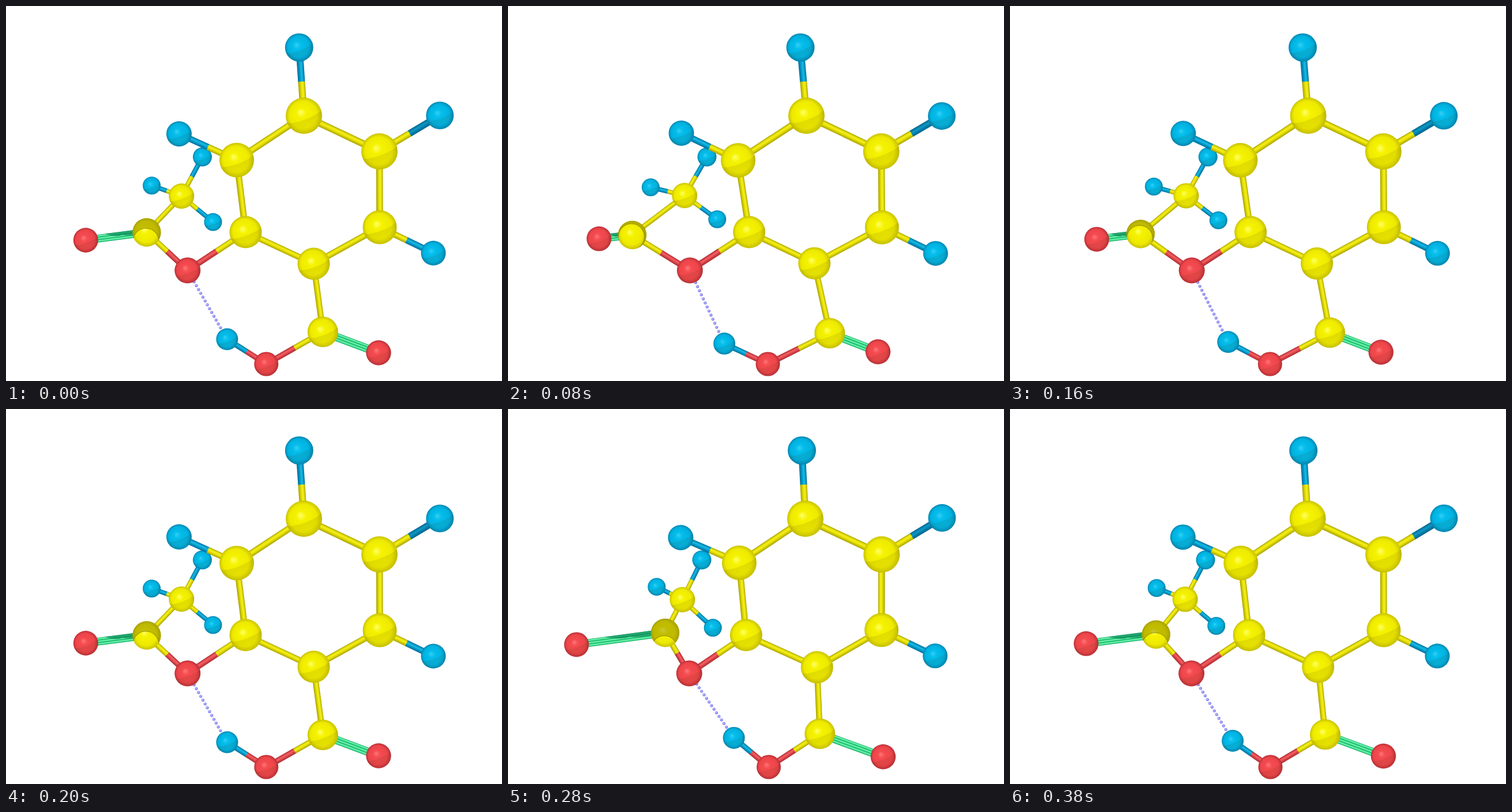
Write an HTML page with a canvas that moves like this. It is 860x651 px and loops after 400 ms.

```html
<!DOCTYPE html>
<html lang="en">
<head>
<meta charset="utf-8">
<title>Molecular vibration</title>
<style>
html, body { margin: 0; width: 100%; height: 100%; overflow: hidden; background: #fff; }
canvas { display: block; }
</style>
</head>
<body>
<canvas id="stage" width="860" height="651"></canvas>
<script>
const ctx = document.getElementById('stage').getContext('2d');
const PERIOD = 400, STEP = 20, TAU = Math.PI * 2;

// light, body, rim colours; size relative to a carbon at the same depth
const KINDS = {
  C: { tones: ['#ffff66', '#f5f200', '#eeea00', '#c9c200'], rod: ['#a8a100', '#e3dd00', '#f5ef20'], size: 1 },
  H: { tones: ['#35cff5', '#04bdeb', '#00b2e0', '#0086b2'], rod: ['#006c98', '#009fce', '#20b9e3'], size: .77 },
  O: { tones: ['#ff7778', '#f44b4f', '#ec454a', '#b93037'], rod: ['#a92f35', '#df4549', '#f26468'], size: .83 }
};
const GREEN = ['#16a266', '#3ce28d', '#8af6bb'];

// kind, x, y, radius, swing x, swing y
const ATOMS = {
  c1: ['C', 516.5, 190.5, 31.5, 1, 0],
  c2: ['C', 647.5, 252.5, 31.5, -.3, 0],
  c3: ['C', 648, 384, 29.5, .4, .2],
  c4: ['C', 533.5, 447.5, 28, -2.4, -.8],
  c5: ['C', 415.5, 392.5, 28, 2.8, 0],
  c6: ['C', 400, 267.5, 30, -1, .6],
  h1: ['H', 508.3, 72, 24.5, -1.3, 0],
  h2: ['H', 752.3, 190, 24, -.2, 1],
  h3: ['H', 741, 429, 21.5, .4, .5],
  h6: ['H', 300, 222, 22, .6, -1.3],
  acid: ['C', 549.3, 565.8, 26.5, 9, 2.2],
  oAcid: ['O', 646, 602, 21.7, -4.7, -1.8],
  oh: ['O', 451.3, 621.5, 21, -.8, 0],
  hAcid: ['H', 383.4, 578.5, 19, -8.7, 8],
  ester: ['O', 314.8, 459, 22.5, .6, 0],
  acyl: ['C', 244, 393, 24.7, -30, 4.7],
  oAcyl: ['O', 138.3, 406.5, 21.5, 20.5, -2.6],
  methyl: ['C', 304.3, 330, 22, 2, -1],
  ha: ['H', 340.5, 262, 16.5, 4.7, 0],
  hb: ['H', 252.6, 311.7, 15.5, -5.5, 3.2],
  hc: ['H', 359, 375, 15.5, 4, -5]
};
const BONDS = `c1 c2,c2 c3,c3 c4,c4 c5,c5 c6,c6 c1,c1 h1,c2 h2,c3 h3,c6 h6,
c4 acid,acid oh,oh hAcid,c5 ester,ester acyl,acyl methyl,methyl ha,methyl hb,methyl hc,
acid oAcid 2,acyl oAcyl 2`.split(',').map(b => b.trim().split(' '));

function pose(s) {
  const out = {};
  for (const [id, [kind, x, y, r, dx, dy]] of Object.entries(ATOMS))
    out[id] = { id, kind, x: x + dx * s, y: y + dy * s, r, depth: r / KINDS[kind].size };
  return out;
}

function rod(x, w, len, [rim, body, light]) {
  const g = ctx.createLinearGradient(0, -w / 2, 0, w / 2);
  [[0, rim], [.22, body], [.42, light], [.62, body], [1, rim]].forEach(([at, c]) => g.addColorStop(at, c));
  ctx.fillStyle = g;
  ctx.fillRect(x, -w / 2, len, w);
}

function bond(a, b, double) {
  const dx = b.x - a.x, dy = b.y - a.y, len = Math.hypot(dx, dy);
  const w = .19 * (a.depth + b.depth);
  ctx.save();
  ctx.translate(a.x, a.y);
  ctx.rotate(Math.atan2(dy, dx));
  if (dx < 0) ctx.scale(1, -1);
  if (double) {
    const tube = w * .53;
    for (const side of [-1, 0, 1]) {
      ctx.save();
      ctx.translate(0, side * w * .45);
      rod(0, tube, len, GREEN);
      ctx.restore();
    }
    if (a.id === 'acyl') {
      ctx.fillStyle = 'rgba(0,125,80,.62)';
      ctx.beginPath();
      ctx.moveTo(0, -w * .7);
      ctx.lineTo(len * .68, -w * .7);
      ctx.quadraticCurveTo(len * .5, w * .25, len * .4, -w * .1);
      ctx.quadraticCurveTo(len * .3, w * .3, 0, w * .1);
      ctx.fill();
    }
  } else {
    rod(0, w, len / 2 + .5, KINDS[a.kind].rod);
    rod(len / 2, w, len / 2, KINDS[b.kind].rod);
    if (b.id === 'h2') {
      ctx.fillStyle = 'rgba(0,70,110,.3)';
      ctx.fillRect(len / 2, -w / 2, len / 2, w);
    }
  }
  ctx.restore();
}

function disc(x, y, r) {
  ctx.beginPath();
  ctx.arc(x, y, r, 0, TAU);
}

function acylShadow(r, s) {
  const y = 2.5 + (1 - s) * 13;
  ctx.fillStyle = 'rgba(105,98,0,.36)';
  ctx.beginPath();
  ctx.rect(-r, -r, 2 * r, 2 * r);
  ctx.arc(-1.5, y, r - 2, 0, TAU);
  ctx.fill('evenodd');
  disc(-1.5, y, r - 2);
  ctx.strokeStyle = 'rgba(120,112,0,.55)';
  ctx.lineWidth = 1.3;
  ctx.stroke();
}

function ball({ id, kind, x, y, r }, s) {
  const [light, body, mid, rim] = KINDS[kind].tones;
  ctx.save();
  ctx.translate(x, y);
  const g = ctx.createRadialGradient(-r * .2, -r * .2, 0, 0, 0, r);
  [[0, light], [.28, body], [.75, mid], [1, rim]].forEach(([at, c]) => g.addColorStop(at, c));
  ctx.fillStyle = g;
  disc(0, 0, r);
  ctx.fill();
  ctx.clip();
  if (id === 'acyl') acylShadow(r, s);
  else {
    // soft terminator across the lower half
    ctx.rotate(-.36);
    ctx.beginPath();
    ctx.arc(0, 0, r, 0, Math.PI);
    ctx.ellipse(0, 0, r, r * .22, 0, Math.PI, 0, true);
    const shade = ctx.createLinearGradient(0, 0, 0, r);
    shade.addColorStop(0, 'rgba(70,50,0,.12)');
    shade.addColorStop(1, 'rgba(70,50,0,.02)');
    ctx.fillStyle = shade;
    ctx.fill();
  }
  ctx.restore();
}

function hydrogenBond(a, b) {
  for (let k = 3; k <= 15; k++) {
    const x = a.x + (b.x - a.x) * k / 18, y = a.y + (b.y - a.y) * k / 18;
    disc(x, y, 2.7);
    ctx.fillStyle = '#8f8ff0';
    ctx.fill();
    disc(x - .5, y - .5, 1.2);
    ctx.fillStyle = '#bcbcff';
    ctx.fill();
  }
}

function draw(s) {
  const p = pose(s);
  ctx.fillStyle = '#fff';
  ctx.fillRect(0, 0, 860, 651);
  hydrogenBond(p.ester, p.hAcid);
  const parts = Object.values(p).map(a => ({ z: a.depth, paint: () => ball(a, s) }));
  for (const [i, j, double] of BONDS) {
    const a = p[i], b = p[j];
    parts.push({ z: Math.min(a.depth, b.depth) - .01, paint: () => bond(a, b, double) });
  }
  parts.sort((a, b) => a.z - b.z).forEach(part => part.paint());
}

const start = performance.now();
function tick() {
  const t = Math.max(0, performance.now() - start) % PERIOD;
  draw(Math.sin(Math.floor(t / STEP) * STEP / PERIOD * TAU));
  requestAnimationFrame(tick);
}
tick();
</script>
</body>
</html>
```
